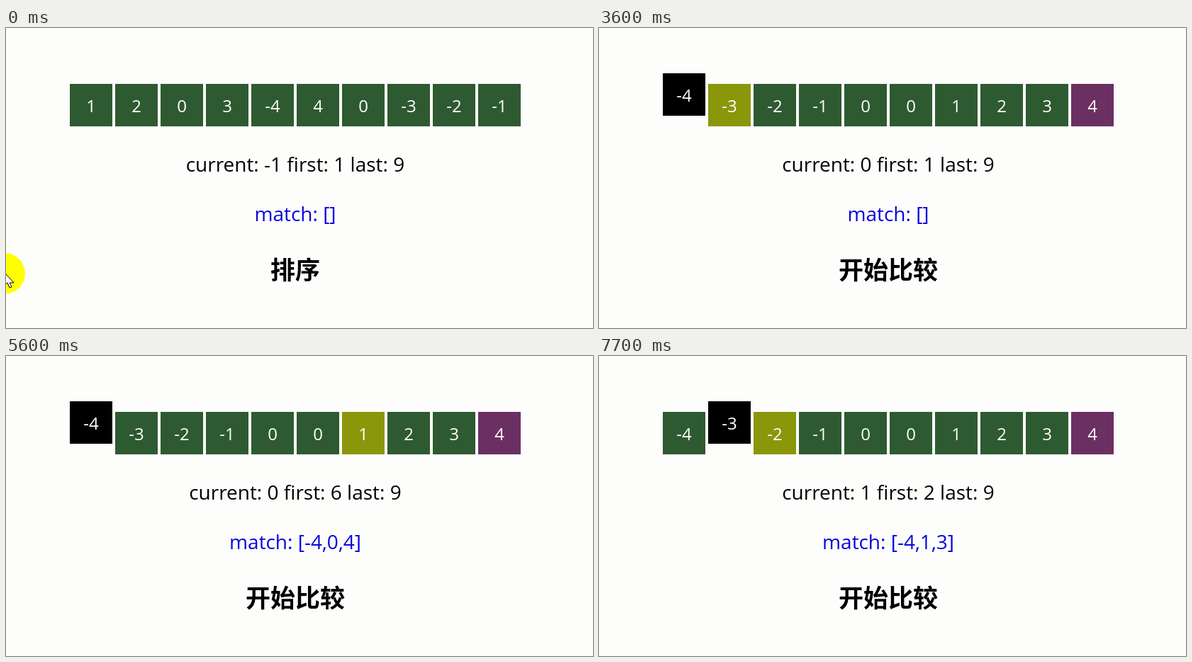
Animation, 828 px wide and 424 px high, one loop 8 s. Source, as an HTML page:

```html
<!DOCTYPE html>
<html lang="zh-CN">
<head>
<meta charset="utf-8">
<style>
  html, body { margin: 0; width: 100%; height: 100%; overflow: hidden; background: #fdfdfc; }
  svg { display: block; width: 828px; height: 424px; }
  text { font: 28px "Open Sans", "Noto Sans", sans-serif; text-anchor: middle; }
  .cell text { font-size: 24px; fill: #fff; }
  #match { fill: #0808dc; }
  #title { font: bold 35px "Noto Sans CJK SC", "Noto Sans CJK", sans-serif; }
</style>
</head>
<body>
<svg viewBox="0 0 828 424">
  <g id="cells"></g>
  <text id="status" x="408" y="203"></text>
  <text id="match" x="408" y="273"></text>
  <text id="title" x="408" y="355"></text>
  <g id="pointer">
    <circle cx="-2" cy="347" r="29" fill="#ff0"/>
    <path d="M-2 346v18l4-4 3 7 3-1-3-6h6z" fill="#fff" stroke="#000"/>
  </g>
</svg>
<script>
const DURATION = 8000, SORT_AT = 100, COMPARE_AT = 2700;
const GREEN = '#2e5a31', OLIVE = '#8a970b', PURPLE = '#6c2f62', BLACK = '#000';
const unsorted = [1, 2, 0, 3, -4, 4, 0, -3, -2, -1];
const sorted = [...unsorted].sort((a, b) => a - b);

// [time, current, first, last, match]
const steps = [
  [0, -1, 1, 9, ''],
  [3600, 0, 1, 9, ''],
  [4100, 0, 2, 9, ''],
  [4600, 0, 3, 9, ''],
  [5100, 0, 4, 9, ''],
  [5600, 0, 6, 9, '-4,0,4'],
  [6100, 0, 6, 8, '-4,0,4'],
  [6600, 0, 7, 8, '-4,1,3'],
  [7100, 0, 7, 7, '-4,1,3'],
  [7600, 1, 2, 9, '-4,1,3']
];

const $ = id => document.getElementById(id);
$('cells').innerHTML = unsorted.map(() =>
  '<g class="cell"><rect width="60" height="60"/><text x="30" y="40"></text></g>').join('');
const cells = [...$('cells').children];

function draw(t) {
  const [, current, first, last, match] = steps.findLast(step => step[0] <= t);
  const comparing = t >= COMPARE_AT;
  const values = t < SORT_AT ? unsorted : sorted;

  cells.forEach((cell, i) => {
    const [box, label] = cell.children;
    const color = !comparing ? GREEN
      : i === current ? BLACK
      : i === first ? OLIVE
      : i === last ? PURPLE : GREEN;
    box.setAttribute('fill', color);
    label.textContent = values[i];
    cell.setAttribute('transform', `translate(${90 + 64 * i} ${i === current ? 64 : 79})`);
  });

  $('status').textContent = `current: ${current} first: ${first} last: ${last}`;
  $('match').textContent = `match: [${match}]`;
  $('title').textContent = comparing ? '开始比较' : '排序';
  $('pointer').setAttribute('transform', t < 400 ? '' : 'translate(-14 37)');
  $('pointer').setAttribute('visibility', t < 500 ? 'visible' : 'hidden');
}

const start = performance.now();
function tick() {
  draw((performance.now() - start) % DURATION);
  requestAnimationFrame(tick);
}
tick();
</script>
</body>
</html>
```
